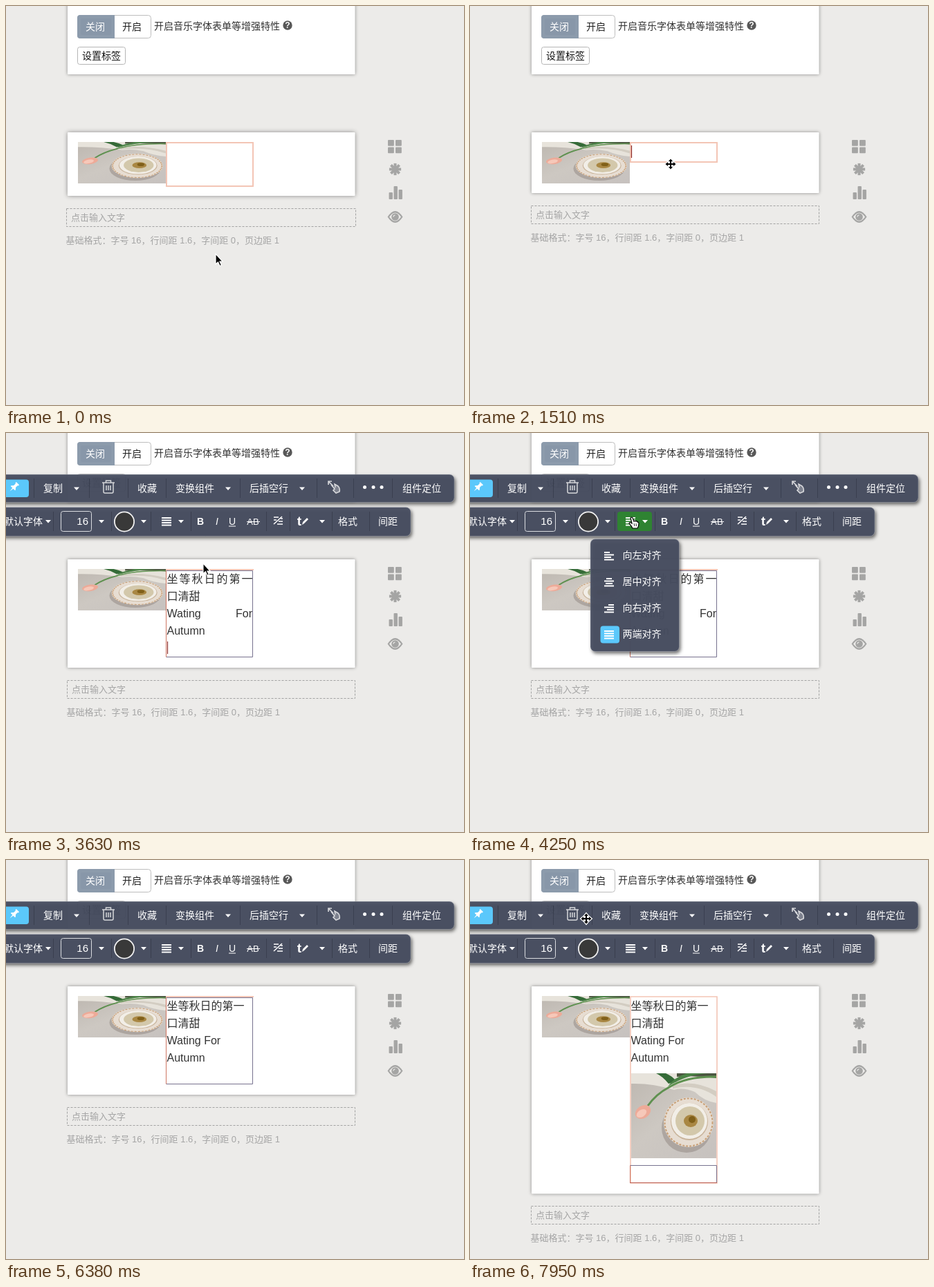
An HTML page with a canvas for the animation above (8000 ms loop, 662 by 578 pixels).

```html
<!DOCTYPE html>
<html lang="zh-CN">
<head>
<meta charset="utf-8">
<title>Editor</title>
<style>
html, body { margin: 0; width: 100%; height: 100%; overflow: hidden; background: #ecebe9; }
canvas { display: block; width: 662px; height: 578px; }
</style>
</head>
<body>
<canvas id="stage"></canvas>
<script>
const W = 662, H = 578, LOOP = 8000, STEP = 88.3;
const FAMILY = '"Liberation Sans", "Noto Sans CJK SC", "Noto Sans CJK", sans-serif';
const BAR = 'rgba(72,79,97,.95)', BLUE = '#5bc8fb', GREEN = '#2f8332', PINK = '#f3c5b5', ICON = '#a5a5a4';
const canvas = document.getElementById('stage');
const dpr = window.devicePixelRatio || 1;
canvas.width = W * dpr;
canvas.height = H * dpr;
const c = canvas.getContext('2d');

// time, card bottom, text box bottom
const LAYOUT = [[0, 275, 260], [1330, 271, 225], [2390, 340, 324], [6560, 483.5, 468]];

// time, x, y, shape
const POINTER = [
  [0, 303, 360, 'arrow'], [90, 302, 345, 'arrow'], [350, 292, 245, 'arrow'], [530, 287, 224, 'arrow'],
  [700, 287, 224, 'arrow'], [705, 290, 229, 'move'], [1580, 290, 229, 'beam'], [2390, 289, 229, 'beam'],
  [2660, 289, 229, 'beam'], [2830, 289, 232, 'beam'], [3010, 289, 233, 'beam'], [3190, 288, 244, 'beam'],
  [3450, 288, 244, 'beam'], [3620, 285, 190, 'arrow'], [3710, 266, 125, 'hand'], [3800, 245, 105, 'hand'],
  [3970, 237, 130, 'hand'], [4330, 237, 130, 'hand'], [4500, 230, 178, 'hand'], [4680, 230, 178, 'hand'],
  [4770, 250, 205, 'beam'], [4940, 272, 262, 'beam'], [5300, 281, 313, 'beam'], [5760, 281, 313, 'beam'],
  [5850, 190, 240, 'arrow'], [5940, 60, 140, 'hand'], [6020, -30, 135, 'hand'], [6290, -30, 203, 'move'],
  [6370, -5, 203, 'move'], [6470, 8, 215, 'arrow'], [6820, 130, 350, 'arrow'], [7000, 245, 430, 'beam'],
  [7150, 276, 451, 'beam'], [7430, 276, 451, 'beam'], [7600, 250, 350, 'move'], [7770, 195, 160, 'move'],
  [7940, 168, 85, 'move'], [8000, 168, 85, 'move']
];

// from, to, x, y
const CARETS = [
  [1330, 2040, 233.5, 202], [2390, 2830, 233.5, 302], [3370, 3890, 233.5, 302],
  [4420, 4940, 233.5, 302], [5580, 5850, 349.5, 202], [7080, 7430, 233.5, 445]
];

const within = (t, a, b) => t >= a && t < b;

function text(s, x, y, size = 14, color = '#fff', style = '', align = 'left') {
  c.font = `${style} ${size}px ${FAMILY}`;
  c.fillStyle = color;
  c.textAlign = align;
  c.fillText(s, x, y);
}

function box(x, y, w, h, r, fill, stroke, lw = 1) {
  c.beginPath();
  c.roundRect(x, y, w, h, r);
  if (fill) { c.fillStyle = fill; c.fill(); }
  if (stroke) { c.strokeStyle = stroke; c.lineWidth = lw; c.stroke(); }
}

function disc(x, y, rx, fill, ry = rx, angle = 0) {
  c.beginPath();
  c.ellipse(x, y, rx, ry, angle, 0, Math.PI * 2);
  c.fillStyle = fill;
  c.fill();
}

function line(points, color, lw = 1, dash = []) {
  c.beginPath();
  points.forEach(([x, y], i) => i ? c.lineTo(x, y) : c.moveTo(x, y));
  c.strokeStyle = color;
  c.lineWidth = lw;
  c.setLineDash(dash);
  c.stroke();
  c.setLineDash([]);
}

function shape(d, fill, stroke, lw = 1) {
  const p = new Path2D(d);
  if (fill) { c.fillStyle = fill; c.fill(p); }
  if (stroke) { c.strokeStyle = stroke; c.lineWidth = lw; c.stroke(p); }
}

function at(x, y, draw) {
  c.save();
  c.translate(x, y);
  draw();
  c.restore();
}

function shadow(color, blur, dx, dy, draw) {
  c.save();
  c.shadowColor = color;
  c.shadowBlur = blur * dpr;
  c.shadowOffsetX = dx * dpr;
  c.shadowOffsetY = dy * dpr;
  draw();
  c.restore();
}

function card(y, bottom, focused) {
  shadow('rgba(0,0,0,.42)', focused ? 5 : 6, 0, 0, () => box(89, y, 415.5, bottom - y, 1, '#fff'));
}

// soft still life, drawn in a 123 unit square
function photo(x, y, w, h) {
  c.save();
  c.beginPath();
  c.rect(x, y, w, h);
  c.clip();
  c.translate(x, y);
  c.scale(w / 123, h / 123);
  const g = c.createLinearGradient(0, 0, 110, 123);
  g.addColorStop(0, '#bdb7b0');
  g.addColorStop(.5, '#cdc8c2');
  g.addColorStop(1, '#c7c2bf');
  c.fillStyle = g;
  c.fillRect(0, 0, 123, 123);
  shape('M0 0H123V43Q105 40 92 27Q75 20 62 24Q30 14 0 15Z', '#e7e3db');
  shape('M60 18Q90 8 123 26V34Q95 14 60 22Z', '#d3cdc2');
  shape('M66 0H123V7Q95 3 66 5Z', '#4c5641');
  shape('M24 47Q36 30 55 20Q80 4 123 5', null, '#5f9150', 3);
  shape('M36 0Q45 4 54 15L66 12Q58 3 50 0Z', '#356b38');
  shape('M53 19Q80 2 110 0H80Q62 6 53 19Z', '#4c8347');
  disc(17, 56, 12, '#edaa98', 9, -.6);
  disc(15, 58, 8, '#f6c8b9', 5, -.6);
  disc(80, 79, 36, 'rgba(104,91,83,.3)');
  disc(83, 71, 36, '#e7ddd2');
  c.beginPath();
  c.arc(83, 71, 34.5, 0, Math.PI * 2);
  c.strokeStyle = '#c8a078';
  c.lineWidth = 2;
  c.setLineDash([3, 2]);
  c.stroke();
  c.setLineDash([]);
  disc(84, 70, 27, '#c9b49b');
  disc(84, 69, 26, '#f2eee7');
  disc(85, 69, 21, '#d3c8ab');
  disc(86, 69, 10, '#a98743', 9);
  disc(88, 67, 5, '#806019');
  c.restore();
}

function topPanel() {
  card(-20, 99, true);
  box(103.5, 13.5, 106, 33, 4, '#fff', '#bdbdbd');
  box(103, 13, 54, 34, [4, 0, 0, 4], '#8c9bac');
  box(108, 18, 44, 24, 2, 'rgba(130,144,163,.35)');
  text('关闭', 115, 35);
  text('开启', 168, 35, 14, '#222');
  text('开启音乐字体表单等增强特性', 214, 34, 14, '#333');
  disc(407, 28, 6.7, '#585858');
  text('?', 407, 32.3, 12, '#fff', 'bold', 'center');
  box(103.5, 59.5, 69, 25, 3, '#fff', '#b5b5b5');
  text('设置标签', 110, 77, 14, '#111');
}

function sideIcons() {
  for (const x of [552, 563]) for (const y of [194, 204.5]) box(x, y, 8.8, 8.8, 1, ICON);
  for (let i = 0; i < 4; i++) {
    const a = i * Math.PI / 4, dx = Math.cos(a) * 8.6, dy = Math.sin(a) * 8.6;
    line([[562.5 - dx, 236.5 - dy], [562.5 + dx, 236.5 + dy]], ICON, 4);
  }
  [[553.5, 270], [560.5, 261], [567.5, 266]].forEach(([x, y]) => box(x, y, 5.4, 280 - y, 1, ICON));
  at(562.5, 305.5, () => {
    shape('M-11 0Q0 -17 11 0Q0 17 -11 0Z', ICON);
    shape('M-8.5 0Q0 -12 8.5 0Q0 12 -8.5 0Z', '#ecebe9');
    disc(0, 0, 5.3, ICON);
    shape('M-2.5 0Q-2.5 -2.5 0 -2.5', null, '#ecebe9', 1.2);
  });
}

function copyText(justified) {
  const color = '#333';
  [...'坐等秋日的第一'].forEach((ch, i) => text(ch, 232.5 + i * (justified ? 18 : 16), 217, 16, color));
  text('口清甜', 232.5, 242, 16, color);
  if (justified) {
    text('Wating', 232.5, 267, 16, color);
    text('For', 356, 267, 16, color, '', 'right');
  } else text('Wating For', 232.5, 267, 16, color);
  text('Autumn', 232.5, 292, 16, color);
}

function selection(top, bottom) {
  line([[231.5, top], [356.5, top], [356.5, bottom], [231.5, bottom]], '#77728f');
  line([[231.5, top], [231.5, bottom]], '#cf7663');
}

function hoverGuides(bottom, hasPhoto) {
  c.setLineDash([3, 2]);
  c.lineWidth = 1;
  c.strokeStyle = '#47b9ca';
  c.strokeRect(104.5, 197.5, 384, bottom - 197);
  c.setLineDash([]);
  box(231.5, 197.5, 126, bottom - 197, 0, null, hasPhoto ? '#f0a68e' : PINK);
  c.setLineDash([3, 2]);
  c.strokeStyle = '#da725c';
  c.strokeRect(231.5, 197.5, 126, bottom - 197);
  if (hasPhoto) {
    c.strokeStyle = '#47b9ca';
    c.strokeRect(233.5, 442.5, 122, 24);
  }
  c.setLineDash([]);
}

function mainCard(t) {
  const [, bottom, boxBottom] = LAYOUT.filter(s => s[0] <= t).pop();
  const hasPhoto = t >= 6560, tools = toolsOpen(t);
  const focused = within(t, 1330, 6560) || t >= 7350;
  card(183, bottom, focused);
  photo(104, 197, 127, 60);
  if (t >= 2390) copyText(t < 4600);
  if (hasPhoto) photo(233, 309, 123, 123);

  if (within(t, 350, 1330) || within(t, 6820, 7350)) hoverGuides(boxBottom, hasPhoto);
  else if (t >= 2390 && !hasPhoto) {
    line([[231, 198], [358, 198]], PINK, 2);
    selection(199.5, boxBottom + .5);
  } else {
    box(232, 198, 125, boxBottom - 198 + (hasPhoto ? 0 : 1), 0, null, PINK, hasPhoto ? 1.6 : 2);
    if (hasPhoto && tools) {
      selection(442.5, 467.5);
      line([[231, 467.5], [357, 467.5]], '#bd6257');
    }
  }

  for (const [a, b, x, y] of CARETS)
    if (within(t, a, b)) line([[x, y], [x, y + 18]], '#8c2c28', 1.2);

  const inset = focused ? 1 : 0, y = Math.floor(bottom) + 18;
  c.setLineDash([3, 2]);
  box(87.5 + inset, y + .5, 418 - inset * 2, 26, 0, null, '#a2a2a2');
  c.setLineDash([]);
  text('点击输入文字', 94 + inset, y + 18, 13, '#a5a5a5');
  text('基础格式：字号 16，行间距 1.6，字间距 0，页边距 1', 86.5 + inset, y + 51, 13, '#a5a5a5');
}

const toolsOpen = t => within(t, 1590, 6560) || t >= 7440;

function panel(x, y, w, h) {
  shadow('rgba(0,0,0,.6)', 5, 2, 3, () => box(x, y, w, h, 7, BAR));
  box(x, y, w, h, 7, null, 'rgba(210,213,220,.5)', .7);
}

const drop = (x, y) => shape(`M${x - 4} ${y - 2}h8l-4 4.5z`, '#fff');

const splits = (xs, y) => xs.forEach(x => line([[x + .5, y - 14], [x + .5, y + 14]], 'rgba(25,28,40,.3)'));

// kind: 0 left, 1 centre, 2 right, 3 justified
function alignIcon(x, y, kind) {
  [8, 14, 10, 14].forEach((len, i) => {
    const w = kind === 3 ? 14 : len;
    c.fillStyle = '#fff';
    c.fillRect(x + (14 - w) * Math.min(kind, 2) / 2 * (kind < 3), y - 6 + i * 3.5, w, 2);
  });
}

function toolbar(t) {
  panel(-12, 60, 660, 40.5);
  splits([40, 120, 176, 231, 338, 449, 502, 558], 80);
  box(-8, 67.5, 41, 25.5, 4, BLUE);
  at(12, 78, () => {
    c.rotate(Math.PI / 4);
    shape('M-3 -7H3V-5H2V-1L4.5 2V3H.8L0 9L-.8 3H-4.5V2L-2 -1V-5H-3Z', '#fff');
  });
  text('复制', 54, 85);
  text('收藏', 190, 85);
  text('变换组件', 245, 85);
  text('后插空行', 352, 85);
  text('组件定位', 573, 85);
  for (const x of [102, 321, 428]) drop(x, 80.5);
  at(148, 78, () => {
    shape('M-9 -6H9M-3.5 -6V-9H3.5V-6M-7 -6V7Q-7 9 -5 9H5Q7 9 7 7V-6M-3 -2V5M0 -2V5M3 -2V5', null, '#d6d7da', 1.5);
  });
  at(474, 78, () => {
    shape('M-8 -8L-1 -1M-8 -3V-8H-3', null, '#d4d5d9', 1.7);
    shape('M-4 -3L1 3L-1 5L3 9L8 7Q9 2 6 -1L1 -4L2 1', 'rgba(220,220,225,.35)', '#d8d9dc', 1.6);
  });
  for (const x of [518.5, 531, 543]) disc(x, 78.5, 2.5, '#fff');

  panel(-12, 107.5, 597, 42);
  splits([68, 152, 209, 267, 376, 410, 471, 525], 128);
  text('默认字体', -3, 133);
  box(79.5, 113.5, 44, 29, 3, null, '#dadce0');
  text('16', 119, 133, 15, '#fff', '', 'right');
  disc(171, 128.5, 15, '#f2f2f2');
  disc(171, 128.5, 13.2, '#393939');
  if (within(t, 3880, 4770)) box(213, 114, 50, 28, 4, GREEN);
  alignIcon(225, 128, t >= 4600 && t < 4770 ? 0 : 3);
  for (const x of [61, 138, 199, 253, 457]) drop(x, 128);
  text('B', 281, 133, 14, '#fff', 'bold', 'center');
  text('I', 305, 133, 14, '#fff', 'italic', 'center');
  text('U', 327, 133, 14, '#fff', '', 'center');
  line([[322, 135], [332, 135]], '#fff');
  text('AB', 357, 133, 13, '#fff', '', 'center');
  line([[348, 128.5], [367, 128.5]], '#fff');
  at(393, 127, () => shape('M-6 -5H1M-6 -1H-2M-6 5L6 -6M1 1H7M-1 5H7M4 -3H7', null, '#fff', 1.5));
  text('t', 424, 134, 19, '#fff', 'bold', 'center');
  at(431, 128, () => shape('M-3 5L-2 1L4 -5L6 -3L0 3Z', '#fff'));
  text('格式', 480, 133);
  text('间距', 538, 133);
}

function alignMenu(t) {
  panel(174, 153.5, 128.5, 163);
  const chosen = t >= 4600 ? 0 : 3;
  ['向左对齐', '居中对齐', '向右对齐', '两端对齐'].forEach((label, i) => {
    const y = 177 + i * 38;
    if (i === 0 && within(t, 4420, 4600)) box(181, y - 15, 115, 30, 4, GREEN);
    if (i === chosen) box(188.5, y - 11.5, 27.5, 25, 4, BLUE);
    alignIcon(194, y + 1, i);
    text(label, 220.5, y + 4.5);
  });
}

const CURSORS = {
  arrow() {
    shape('M0 -1V14L3.5 11L6 16.5L8.5 15.5L6 10.2H10.2Z', '#000', '#fff', 1.2);
  },
  move() {
    const d = 'M0 -7.5L3 -4H1V-1H4V-3L7.5 0L4 3V1H1V4H3L0 7.5L-3 4H-1V1H-4V3L-7.5 0L-4 -3V-1H-1V-4H-3Z';
    shape(d, null, '#fff', 2.5);
    shape(d, '#000');
  },
  beam() {
    const d = 'M-3.5 -7.5Q0 -7.5 0 -5.5Q0 -7.5 3.5 -7.5M0 -5.5V5.5M-3.5 7.5Q0 7.5 0 5.5Q0 7.5 3.5 7.5M-2 1.5H2';
    shape(d, null, '#fff', 3);
    shape(d, null, '#000', 1.3);
  },
  hand() {
    shape('M-5 -7Q-3.5 -9 -2 -7L0 -2Q1 -4 2.3 -2Q4 -3.3 5 -1Q6.5 -1.5 7 1Q7 5 5 8H-2Q-4 4 -7 1Q-7 -1 -4.5 0L-3 1Z',
      '#fff', '#000', 1.2);
    line([[0, 1], [1, 5]], '#000', .8);
    line([[3, 1], [3.5, 5]], '#000', .8);
  }
};

function pointer(t) {
  const q = Math.floor(t / STEP) * STEP;
  const i = POINTER.findIndex(p => p[0] > q) - 1;
  const [t0, x0, y0, kind] = POINTER[i], [t1, x1, y1] = POINTER[i + 1];
  const k = (q - t0) / (t1 - t0);
  at(x0 + (x1 - x0) * k, y0 + (y1 - y0) * k, CURSORS[kind]);
}

function render(t) {
  c.setTransform(dpr, 0, 0, dpr, 0, 0);
  c.fillStyle = '#ecebe9';
  c.fillRect(0, 0, W, H);
  topPanel();
  mainCard(t);
  sideIcons();
  if (toolsOpen(t)) toolbar(t);
  if (within(t, 4160, 4770)) alignMenu(t);
  pointer(t);
}

function frame(now) {
  render(now % LOOP);
  requestAnimationFrame(frame);
}
requestAnimationFrame(frame);
</script>
</body>
</html>
```
